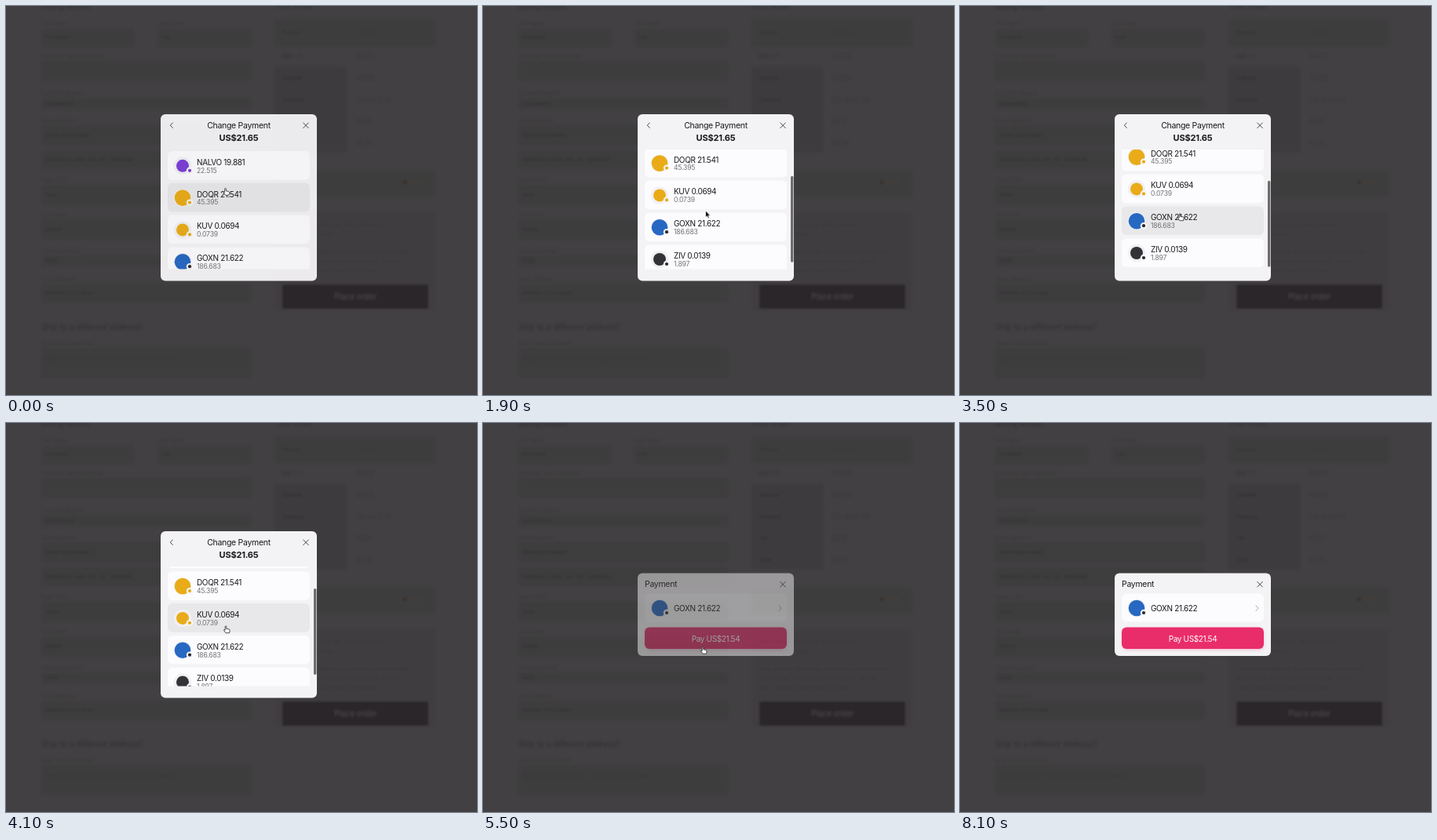
Recreate the animation shown at these times as an HTML page. Size 600 by 496 pixels, loop 8800 ms.

```html
<!DOCTYPE html>
<html lang="en">
<head>
<meta charset="utf-8">
<title>Change payment</title>
<style>
html, body { margin: 0; width: 100%; height: 100%; overflow: hidden; background: #424042; }
svg { display: block; width: 100%; height: 100%; font-family: Inter, Roboto, sans-serif; }
.title { font-size: 10.5px; letter-spacing: -.3px; fill: #1a191b; }
.sum { font-size: 11px; font-weight: 700; letter-spacing: -.2px; fill: #1a191b; }
.name { font-size: 10px; letter-spacing: -.35px; fill: #1a191b; }
.sub { font-size: 8.6px; letter-spacing: -.2px; fill: #747276; }
.line { fill: none; stroke: #49474b; stroke-linecap: round; stroke-linejoin: round; }
</style>
</head>
<body>
<svg viewBox="0 0 600 496">
  <defs>
    <filter id="soft" x="-5%" y="-5%" width="110%" height="110%"><feGaussianBlur stdDeviation="1.5"/></filter>
    <filter id="glow" x="-10%" y="-30%" width="120%" height="170%"><feGaussianBlur stdDeviation="2"/></filter>
    <clipPath id="view"><rect x="200" y="183" width="190" height="152.5"/></clipPath>
  </defs>
  <rect width="600" height="496" fill="#424042"/>
  <g id="page" filter="url(#soft)"></g>

  <g id="picker">
    <rect x="197" y="138" width="199" height="212.5" rx="6" fill="#f3f2f4"/>
    <path class="line" d="M212.3 149l-3 3.2 3 3.2"/>
    <path class="line" d="M378.7 149l6.6 6.6m0-6.6l-6.6 6.6"/>
    <text class="title" x="296.5" y="155.8" text-anchor="middle">Change Payment</text>
    <text class="sum" x="296.5" y="172.2" text-anchor="middle">US$21.65</text>
    <g clip-path="url(#view)"><g id="list"></g></g>
    <rect id="bar" x="392" width="3.4" height="110" rx="1.7" fill="#6c6b6e"/>
  </g>

  <g id="pay">
    <rect x="197" y="191.5" width="199" height="105.5" rx="6" fill="#f3f2f4"/>
    <text class="title" x="206" y="209.3">Payment</text>
    <path class="line" d="M378.7 202.4l6.6 6.6m0-6.6l-6.6 6.6"/>
    <rect x="206" y="217.5" width="181" height="36" rx="6" fill="#fcfbfd"/>
    <g id="chosen"></g>
    <path class="line" d="M377 232.8l3 3.4-3 3.4" style="stroke:#a9a7ab"/>
    <rect x="207" y="263" width="179" height="26" rx="6" fill="#e92d6b" opacity=".3" filter="url(#glow)"/>
    <rect id="button" x="206" y="260.5" width="181" height="27.5" rx="6"/>
    <text class="name" x="296.5" y="278.6" text-anchor="middle" style="fill:#fff">Pay US$21.54</text>
  </g>

  <g id="cursor">
    <path id="arrow" d="M0 0v8.6l2-1.8 1.3 3 1.5-.6-1.3-3h2.6z" fill="#111" stroke="#fff" stroke-width=".7"/>
    <path id="hand" d="M-.8.8q.8-1.2 1.6 0v3l3.2.6q1.2.3 1.1 1.6l-.6 3.2h-4.6l-2.5-3.6q0-1.2 1.8 0z"
      fill="#fff" stroke="#222" stroke-width=".8" stroke-linejoin="round"/>
  </g>
</svg>
<script>
const el = id => document.getElementById(id);
const LOOP = 8800, STEP = 100, TOP = 185, PITCH = 40.8, ROW = 36.7;

// name, amount, mark colour, badge colour, mark radius
const coins = [
  ['NALVO 19.881', '22.515', '#7b3fd6', '#7b3fd6', 8],
  ['DOQR 21.541', '45.395', '#e9ac18', '#e9ac18', 10.3],
  ['KUV 0.0694', '0.0739', '#e9ac18', '#e9ac18', 8],
  ['GOXN 21.622', '186.683', '#2668c2', '#2b2a2d', 10.3],
  ['ZIV 0.0139', '1.897', '#333236', '#2b2a2d', 8]
];

const rect = (x, y, w, h, fill, rx = 3) =>
  `<rect x="${x}" y="${y}" width="${w}" height="${h}" rx="${rx}" fill="${fill}"/>`;
const disc = (x, y, r, fill) => `<circle cx="${x}" cy="${y}" r="${r}" fill="${fill}"/>`;
const icon = ([, , mark, badge, r], y) =>
  disc(225, y, 11.2, '#f1f0f3') + disc(225, y, r, mark) +
  disc(234, y + 6, 4.2, '#f7f6f9') + disc(234, y + 6, 2.1, badge);

el('list').innerHTML = coins.map((c, i) => {
  const y = TOP + i * PITCH;
  return `<rect class="row" x="206" y="${y}" width="181" height="${ROW}" rx="6"/>` + icon(c, y + 18.8) +
    `<text class="name" x="243" y="${y + 17.7}">${c[0]}</text>` +
    `<text class="sub" x="243" y="${y + 27.6}">${c[1]}</text>`;
}).join('');
const rows = [...document.querySelectorAll('.row')];
el('chosen').innerHTML = icon(coins[3], 236) + `<text class="name" x="243" y="239.7">${coins[3][0]}</text>`;

function drawPage() {
  const field = '#3e3c3e';
  const label = (x, y, s, size = 6.5, fill = '#302e30') =>
    `<text x="${x}" y="${y}" font-size="${size}" fill="${fill}">${s}</text>`;
  const faint = (x, y, s) => label(x, y, s, 6.5, '#383638');
  let out = label(45, 4, 'Billing details', 10) + label(342, 3, 'Your order', 10);
  for (const [y, h, name, value] of [
    [70, 25, 'Company name (optional)', ''], [117, 15, 'Country / Region', 'Somewhere'],
    [152, 25, 'Street address', 'Street and number'], [185, 22, '', 'Apartment, suite, unit, etc. (optional)'],
    [228, 25, 'Town / City', 'Town'], [272, 25, 'Post code', '00000'],
    [318, 14, 'Phone (optional)', '0000'], [354, 24, 'Email address', 'address of the buyer']
  ]) out += rect(45, y, 267, h, field) + faint(45, y - 3, name) + label(50, y + h / 2 + 2, value);
  for (const [x, w, name, value] of [[45, 118, 'First name', 'Firstname'], [193, 119, 'Last name', 'Last']])
    out += rect(x, 29, w, 23, field) + faint(x, 25, name) + label(x + 5, 42, value);
  out += label(45, 413, 'Ship to a different address?', 10) + faint(45, 433, 'Order notes (optional)') +
    rect(45, 436, 267, 38, field) + faint(50, 452, 'Notes about your order, e.g. special notes for delivery.');
  out += rect(342, 17, 205, 34, field) + rect(342, 78, 92, 108, '#3d3b3d');
  for (const [y, a, b] of [[36, 'Product', 'Subtotal'], [66, 'Item × 1', '$20.00'], [94, 'Subtotal', '$20.00'],
    [122, 'Shipping', 'Flat rate: $1.65'], [149, 'Tax', '$0.00'], [177, 'Total', '$21.65']])
    out += label(352, y, a) + faint(446, y, b);
  out += rect(342, 210, 205, 33, field) + disc(356, 225, 2, '#302e30') + label(364, 227, 'Crypto') +
    disc(508, 225, 2.2, '#312b25') + label(514, 227, 'coins', 6.5, '#4b452f') + rect(342, 263, 205, 125, '#403e40');
  ['Pay safely with your own wallet and coins', 'at the checkout page.', 'Your personal data will be used to process your order,',
    'support your experience on this website, and for', 'other purposes described in our policy.']
    .forEach((s, i) => out += faint(352, [281, 293, 316, 328, 340][i], s));
  out += rect(352, 355, 186, 31, '#2a282a', 2) + label(418, 374, 'Place order', 10, '#4b494b');
  el('page').innerHTML = out;
}

// Eased value at t from rows of [time, value, ...]
function at(keys, t, col = 1) {
  const i = keys.findIndex(k => k[0] > t);
  if (i < 0) return keys[keys.length - 1][col];
  if (!i) return keys[0][col];
  const a = keys[i - 1], b = keys[i], u = (t - a[0]) / (b[0] - a[0]);
  return a[col] + (b[col] - a[col]) * u * u * (3 - 2 * u);
}

const scrollKeys = [[0, 0], [700, 48], [900, 52], [1100, 52], [1500, 32], [1900, 44], [2300, 52],
  [2700, 42], [3400, 52], [3600, 52], [4100, 36.5], [4400, 35.8]];
const pointer = [[0, 279.5, 232], [900, 280, 235], [1400, 281, 174], [1900, 283.5, 261], [2300, 281, 268],
  [3500, 280, 264.5], [4100, 280, 258.5], [4500, 280, 285], [5900, 280, 285], [6400, 281.5, 289.5],
  [6600, 281.5, 289.5], [6700, 282, 291], [7100, 283, 281], [7500, 283, 294], [8000, 454, 297]];

function draw(t) {
  const s = at(scrollKeys, t), x = at(pointer, t), y = at(pointer, t, 2);
  const leaving = t >= 4800;
  const inList = !leaving && y > 183 && y < 335.5;
  let over = false;
  rows.forEach((r, i) => {
    const top = TOP + i * PITCH - s;
    const hit = inList && y >= top && y <= top + ROW;
    over = over || hit;
    r.setAttribute('fill', hit ? '#e8e7e9' : '#fcfbfd');
  });
  el('list').setAttribute('transform', `translate(0 ${-s})`);
  el('bar').setAttribute('y', 183.3 + .76 * s);
  el('bar').setAttribute('opacity', t < 100 ? 0 : 1);

  const out = at([[4700, 0], [5150, 1]], t);
  el('picker').setAttribute('transform', `translate(${38 * out} 0)`);
  el('picker').setAttribute('opacity', at([[0, .96], [300, 1], [4700, 1], [5200, .13], [5400, 0]], t));
  el('pay').setAttribute('opacity', at([[5200, 0], [5800, 1]], t));

  const onButton = leaving && y > 260.5 && y < 288 && x < 387;
  el('button').setAttribute('fill', onButton ? '#dd2c66' : '#e92d6b');
  const hand = over || onButton;
  el('hand').setAttribute('opacity', hand ? 1 : 0);
  el('arrow').setAttribute('opacity', hand ? 0 : 1);
  el('cursor').setAttribute('transform', `translate(${x} ${y})`);
  el('cursor').setAttribute('opacity', t < 8100 ? 1 : 0);
}

drawPage();
const start = performance.now();
function tick() {
  const t = (performance.now() - start) % LOOP;
  draw(Math.floor(t / STEP) * STEP);
  requestAnimationFrame(tick);
}
tick();
</script>
</body>
</html>
```
